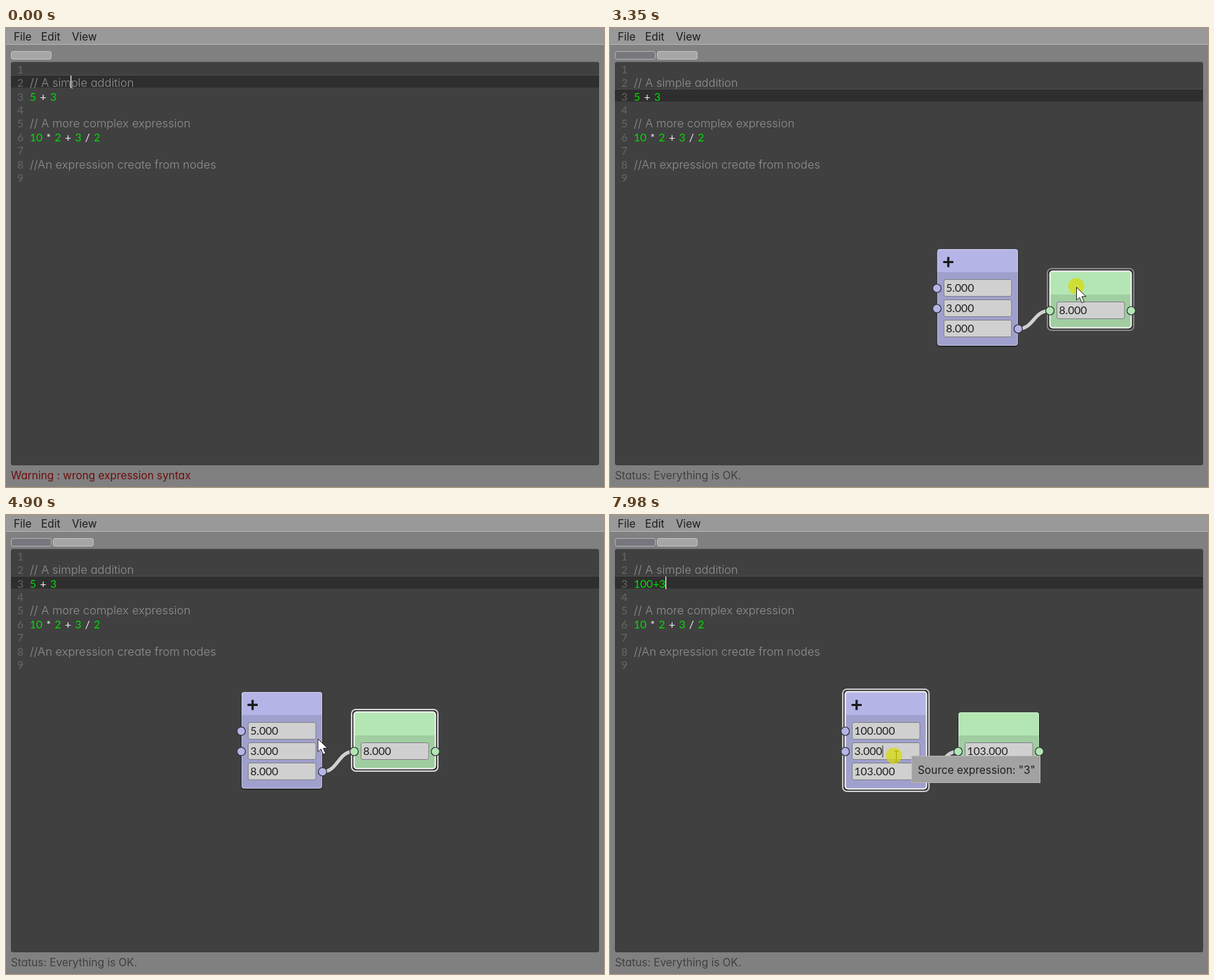
Animation, 853 px wide and 656 px high, one loop 8000 ms. Source, as an HTML page:

```html
<!DOCTYPE html>
<html lang="en">
<head>
<meta charset="utf-8">
<title>Node and text expression editor</title>
<style>
  html, body { margin: 0; width: 100%; height: 100%; overflow: hidden; background: #808080; }
  svg { display: block; width: 853px; height: 656px; }
  text { font: 300 16.5px Inter, "Open Sans", sans-serif; font-feature-settings: "cv11"; white-space: pre; }
  .label { font-weight: 400; font-size: 15.4px; }
  .num { font: 400 15.6px Lato, "Open Sans", sans-serif; word-spacing: 1.4px; }
</style>
</head>
<body>
<svg id="stage" viewBox="0 0 853 656"></svg>
<script>
const LOOP = 8000;
const LINK_OFFSET = [161, 29];
const stage = document.getElementById('stage');

// Key points: [time, x, y]
const mousePath = [
  [270, 643, 622], [1040, 88, 145], [1500, 85, 97], [2300, 85, 97], [3000, 835, 428],
  [3350, 665, 370], [4280, 541, 303], [4900, 444.5, 319.5], [5100, 406, 310],
  [7560, 406, 310], [7800, 408, 345]
];
const dragPath = [[3350, 628, 348], [3740, 470, 290], [3900, 464, 308], [4220, 497, 282]];

function at(keys, t) {
  const next = keys.findIndex(key => key[0] > t);
  if (next === 0) return keys[0].slice(1);
  if (next < 0) return keys[keys.length - 1].slice(1);
  const [t0, x0, y0] = keys[next - 1], [t1, x1, y1] = keys[next];
  const k = (t - t0) / (t1 - t0), eased = k * k * (3 - 2 * k);
  return [x0 + (x1 - x0) * eased, y0 + (y1 - y0) * eased];
}

// The sum node trails the dragged result node after springing into place
function sumPosition(t) {
  const settle = Math.exp(-(t - 2050) / 425);
  const [x, y] = at(dragPath, t - 90);
  return [x - LINK_OFFSET[0] - 4 * settle, y - LINK_OFFSET[1] - 64 * settle];
}

function mousePosition(t) {
  if (!between(t, 3370, 4280)) return at(mousePath, t);
  const [x, y] = at(dragPath, t);
  return [x + 44, y + 21];
}

const between = (t, from, to) => t >= from && t < to;
const rect = (x, y, w, h, fill, extra = '') =>
  `<rect x="${x}" y="${y}" width="${w}" height="${h}" fill="${fill}" ${extra}/>`;
const path = (d, extra) => `<path d="${d}" ${extra}/>`;
const text = (x, y, value, fill, extra = '') =>
  `<text x="${x}" y="${y}" fill="${fill}" ${extra}>${value}</text>`;
const label = (x, y, value, fill) => text(x, y, value, fill, 'class="label"');
const num = (x, y, value, fill, extra = '') => text(x, y, value, fill, `class="num" ${extra}`);

function chrome(compiled) {
  const tab = (x, active) => rect(x, 33.5, 57, 11, active ? '#a6a6a6' : '#77777d',
    `rx="2.5" stroke="${active ? '#c2c2c2' : '#b0b0b6'}"`);
  return rect(0, 0, 853, 656, '#808080') + rect(0, 0, 853, 23, '#999') + rect(0, 23, 853, 1, '#b4b4b4') +
    label(11, 17.5, 'File', '#1c1c1c') + label(50, 17.5, 'Edit', '#1c1c1c') + label(94, 17.5, 'View', '#1c1c1c') +
    tab(7.5, !compiled) + (compiled ? tab(67.5, true) : '') +
    rect(7, 48.5, 839, 576.5, '#404040', 'rx="3"') +
    (compiled ? label(7, 645, 'Status: Everything is OK.', '#404040')
      : label(7, 645, 'Warning : wrong expression syntax', '#6e0c0c'));
}

function editor(t, compiled, operand) {
  const sum = operand === '5' ? '5 + 3' : operand + '+3';
  const lines = ['', '// A simple addition', sum, '', '// A more complex expression',
    '10 * 2 + 3 / 2', '', '//An expression create from nodes', ''];
  const rowTop = i => 48.7 + i * 19.4;
  const current = compiled ? 2 : 1;
  const top = Math.round(rowTop(current));
  const caretX = compiled ? 34 + 9 * sum.replace(/ \+ /, '++').length : 92;
  const caretOn = Math.floor((t - 120) / 395) % 2 !== 0;

  let out = rect(7, top - 1, 839, 19, '#4c4c4c') + rect(7, top, 839, 17.5, '#2e2e2e');
  lines.forEach((line, i) => {
    const y = rowTop(i) + 16;
    const spacedOperators = line.replace(/ ([+*/]) /g, ' <tspan fill="#f0f0f0">$1</tspan> ');
    out += num(25, y, i + 1, '#666', 'text-anchor="end"') +
      (line.startsWith('//') ? text(34, y, line, '#909090') : num(34, y, spacedOperators, '#00df00'));
  });
  return out + (caretOn ? rect(caretX, top, 1.2, 18, '#fff') : '');
}

function node({ x, y, head, body, fields, inputs, plus, caret, selected }, t, dim) {
  const height = 80 + (fields.length - 1) * 29;
  const pulse = .75 - .25 * Math.cos((t - 3350) / 100);
  const port = (px, row) =>
    `<circle cx="${px}" cy="${y + 56 + row * 29}" r="6" fill="${head}" stroke="#303038" stroke-width="1.2"/>`;
  let out = rect(x - 1, y, 117, height + 2, '#000', 'rx="5" opacity=".35"');
  if (selected) {
    out += rect(x - 4, y - 4, 123, height + 8, '#262626',
      `rx="6" stroke="#d8d8d8" stroke-width="2" stroke-opacity="${pulse}"`);
  }
  out += rect(x, y, 115, height, body, 'rx="4"') +
    path(`M${x} ${y + 33}v-29q0-4 4-4h107q4 0 4 4v29z`, `fill="${head}"`) +
    (selected ? rect(x - .5, y - .5, 116, height + 1, 'none', 'rx="4" stroke="#f4f4f4" stroke-width="2"')
      : rect(x + .5, y + .5, 114, height - 1, 'none', 'rx="4" stroke="#fff" stroke-opacity=".35"'));

  out += `<g opacity="${dim ? .42 : 1}">`;
  if (plus) out += path(`M${x + 8.5} ${y + 18.5}h14.5m-7.25-7.25v14.5`, 'stroke="#1c1c1c" stroke-width="3.2" fill="none"');
  fields.forEach((value, row) => {
    const top = y + 43.5 + row * 29;
    out += rect(x + 9.5, top, 96.5, 24, '#d0d0d0', 'rx="2.5" stroke="#808088"') +
      num(x + 12.5, top + 17.5, value, '#1e1e1e');
    if (caret && caret.row === row) out += rect(x + 13 + caret.width, top + 4, 1, 17, '#202020');
  });
  out += '</g>';
  for (let row = 0; row < inputs; row++) out += port(x - .5, row);
  return out + port(x + 115.5, fields.length - 1);
}

function graph(t, operand) {
  const dim = t < 2500;
  const [sx, sy] = sumPosition(t);
  const [rx, ry] = at(dragPath, t);
  const total = (+operand + 3).toFixed(3);
  const typing = between(t, 5970, 7900);
  const first = typing ? operand : (+operand).toFixed(3);
  const caret = t >= 5200 && { row: t < 7900 ? 0 : 1, width: typing ? 9 * operand.length - 1 : 39.5 };

  const x0 = sx + 115, y0 = sy + 114, x1 = rx - 1, y1 = ry + 56;
  const bend = Math.max(22, (x1 - x0) / 2);
  const wire = `M${x0} ${y0}C${x0 + bend} ${y0} ${x1 - bend} ${y1} ${x1} ${y1}`;
  const result = { x: rx, y: ry, head: '#b4e6b4', body: '#a0cea0', fields: [total], inputs: 1,
    selected: between(t, 3330, 5200) };
  const sum = { x: sx, y: sy, head: '#b4b4e6', body: '#a0a0ce', fields: [first, '3.000', total], inputs: 2,
    plus: true, caret, selected: t >= 5200 };
  return path(wire, 'fill="none" stroke="#2c2c2c" stroke-width="6.5" opacity=".5"') +
    path(wire, 'fill="none" stroke="#d0d0ce" stroke-width="5"') +
    node(result, t, dim) + node(sum, t, dim);
}

function tooltip([x, y], value) {
  return rect(x + 22.5, y - .5, 174 + 9 * value.length, 38, '#a2a2a2', 'stroke="#b6b6b6"') +
    label(x + 31, y + 25, `Source expression: "${value}"`, '#1e1e1e');
}

function pointer(t, [x, y]) {
  const pressed = between(t, 3340, 4280) || between(t, 5180, 5300) || t >= 7900;
  const arrow = between(t, 2500, 5050);
  const spot = pressed
    ? `<circle cx="${x - (arrow ? 0 : 3)}" cy="${y - 1}" r="11.5" fill="#dada00" opacity=".7"/>` : '';
  if (arrow) {
    return spot + path(`M${x + .5} ${y + .5}v18.5l4.3-4 3.2 7.6 3.3-1.4-3.2-7.4h6z`, 'fill="#fff" stroke="#222"');
  }
  return path(`M${x - 2.5} ${y - 7.5}h6m-3 0v15m-3 0h6`,
    'fill="none" stroke="#fff" stroke-width="1.1" style="mix-blend-mode:difference"') + spot;
}

function draw(t) {
  const compiled = t >= 2050;
  const operand = t < 5970 ? '5' : t < 6200 ? '1' : t < 7210 ? '10' : '100';
  const mouse = mousePosition(t);
  stage.innerHTML = chrome(compiled) + editor(t, compiled, operand) +
    (compiled ? graph(t, operand) : '') +
    (t >= 5100 ? tooltip(mouse, t < 7700 ? operand : '3') : '') +
    (t >= 270 ? pointer(t, mouse) : '');
}

const start = performance.now();
function tick() {
  draw((performance.now() - start) % LOOP);
  requestAnimationFrame(tick);
}
tick();
</script>
</body>
</html>
```
